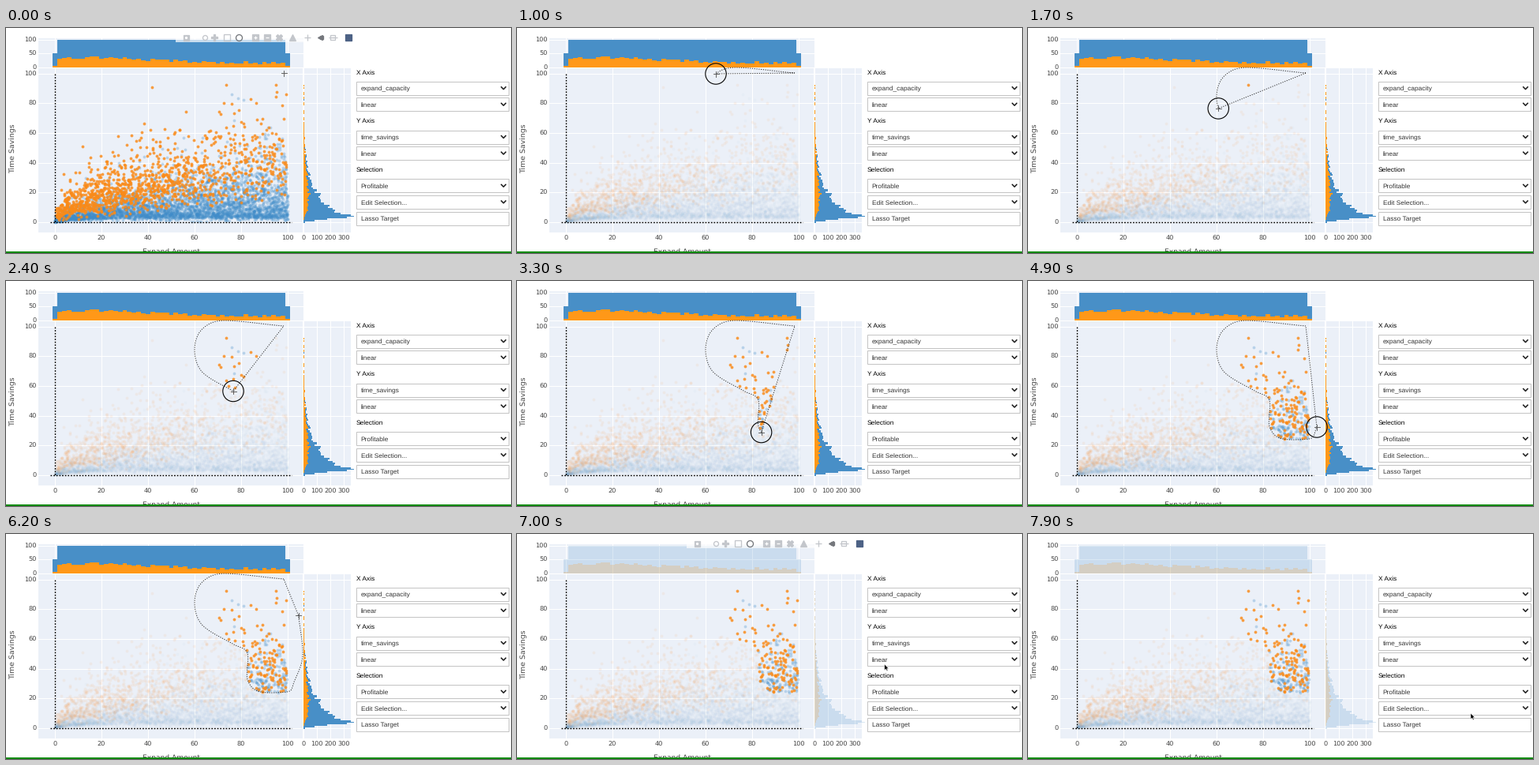
Write a matplotlib script that moves like this. It is 640 px wide and 285 px high and loops after 8 s.

```python
import numpy as np
import matplotlib.pyplot as plt
from matplotlib.animation import FuncAnimation
from matplotlib.patches import Circle, Polygon, Rectangle
from matplotlib.path import Path

W, H, DPI = 640, 285, 100
STEP, FRAMES = 100, 80
PX = 72 / DPI
BLUE, ORANGE, PANEL = "#488fc7", "#ff9818", "#ebf0f8"
PRESS, RELEASE, REFRESH = 300, 6150, 6600
LEAVE, ARRIVE = 6500, 7500

plt.rcParams["text.hinting"] = "none"
fig = plt.figure(figsize=(W / DPI, H / DPI), dpi=DPI, facecolor="white")
ax = fig.add_axes([0, 0, 1, 1])
ax.set_xlim(0, W)
ax.set_ylim(H, 0)
ax.axis("off")


def to_x(v):
    return 62 + 2.95 * np.asarray(v)


def to_y(v):
    return 246 - 1.885 * np.asarray(v)


def box(x0, y0, x1, y1, **kw):
    kw.setdefault("lw", 0)
    return ax.add_patch(Rectangle((x0, y0), x1 - x0, y1 - y0, **kw))


def line(xs, ys, color, width=1, **kw):
    return ax.plot(xs, ys, color=color, lw=width * PX, **kw)[0]


def label(x, y, s, size, font="DejaVu Sans", color="#444444", **kw):
    kw.setdefault("va", "baseline")
    return ax.text(x, y, s, fontsize=size * PX, family=font, color=color, **kw)


# ---- data ----
def make_data(n=5000):
    rng = np.random.default_rng(12)
    x = np.linspace(0, 100, n)
    base = 3 * (1 - np.exp(-x / 12))
    spread = 20 * (x / 100) ** 0.4
    y = base + spread * rng.exponential(size=n) ** 0.85
    band = np.abs(base + 1 + rng.normal(0, 1.5, n) * np.minimum(1, x / 20))
    y = np.where(rng.random(n) < 0.12, band, y)
    y = np.where(y > 95, 0.6 * y, y)
    cost = (5 + 0.4 * x) * np.exp(rng.normal(0, 0.5, n))
    return x, y, y > cost


x, y, good = make_data()
points = np.column_stack([to_x(x), to_y(y)])

# ---- panels and grids ----
TOP, MAIN, SIDE = (41, 13, 376.5, 49.5), (41, 51, 375.5, 259), (377.5, 51, 437, 259)
for area in (TOP, MAIN, SIDE):
    box(*area, fc=PANEL)


def vgrid(gx, area):
    line([gx, gx], area[1::2], "white")


def hgrid(gy, area):
    line(area[::2], [gy, gy], "white")


for v in range(0, 101, 20):
    vgrid(to_x(v), TOP)
    vgrid(to_x(v), MAIN)
    hgrid(to_y(v), MAIN)
    hgrid(to_y(v), SIDE)
    label(to_x(v), 269, v, 8.1, ha="center")
    label(38.5, to_y(v) + 3, v, 8.1, ha="right")
for v in range(0, 101, 50):
    gy = 49.5 - 0.345 * v
    hgrid(gy, TOP)
    label(38.5, gy + 3, v, 8.1, ha="right")
for v in range(0, 301, 100):
    gx = 377.3 + 0.17 * v
    vgrid(gx, SIDE)
    label(gx, 269, v, 8.1, ha="center")
label(8.6, 153, "Time Savings", 9.4, rotation=90, ha="center", va="center")
label(209, 286, "Expand Amount", 9.1, ha="center")

# ---- marginal histograms ----
xbins = np.arange(-1, 102, 2)
ybins = np.arange(-0.5, 101)


def top_bar(values, color):
    count = np.histogram(values, xbins)[0]
    return ax.stairs(49.5 - 0.345 * np.minimum(count, 100), to_x(xbins), baseline=49.5,
                     fill=True, color=color, lw=0, zorder=3)


def side_bar(values, color):
    count = np.histogram(values, ybins)[0]
    length = np.where(count > 0, np.maximum(0.7, 0.17 * count), 0)
    return ax.stairs(377.3 + length, to_y(ybins), baseline=377.3, fill=True,
                     orientation="horizontal", color=color, lw=0, zorder=3)


bars = [top_bar(x, BLUE), top_bar(x[good], ORANGE),
        side_bar(y, BLUE), side_bar(y[good], ORANGE)]


# ---- scatter layers: artist, members, shown when selected ----
def dots(color, alpha):
    return ax.plot([], [], "o", ms=3.8 * PX, mew=0, color=color, alpha=alpha)[0]


layers = [(dots("#3f8cc9", 0.025), ~good, False), (dots("#ff8c2a", 0.08), good, False),
          (dots("#3f8cc9", 0.3), ~good, True), (dots("#fa8a18", 0.82), good, True)]

DOTTED = (0, (1.3, 1.3))
line([62, 62], [58, 246], "black", 1.4, ls=DOTTED)
line([56, 362], [246, 246], "black", 1.4, ls=DOTTED)

# ---- controls ----
SANS = "Liberation Sans"
groups = (("X Axis", "expand_capacity", "linear"), ("Y Axis", "time_savings", "linear"),
          ("Selection", "Profitable", "Edit Selection...", "Lasso Target"))
for g, (title, *fields) in enumerate(groups):
    top = 55.5 + 61.8 * g
    label(444, top + 3, title, 8.4, SANS, "black")
    for k, s in enumerate(fields):
        cy = top + 20.7 + 20.6 * k
        box(444, cy - 8.5, 637, cy + 8.5, fc="white", ec="#c4c4c4", lw=PX)
        label(449.5, cy + 3.1, s, 8.4, SANS, "#333333")
        if s != "Lasso Target":
            line([627.8, 630.5, 633.2], cy + np.array([-1.4, 1.4, -1.4]), "#222222", 1.6)
box(0, 283.3, W, H, fc="#0a8a0a", zorder=8)


# ---- toolbar ----
def make_toolbar():
    grey, dark, logo = "#c3c6cb", "#74777c", "#4d6285"
    out = [(box(215, 6, 441, 18, fc="white", zorder=5), 0.7)]

    def icon(cx, marker, color=grey, size=8, hollow=False):
        art, = ax.plot(cx, 12, marker, ms=size * PX, mec=color, mew=1.3 * PX,
                       mfc="none" if hollow else color, zorder=6)
        out.append((art, 1))

    icon(228, "s", size=7)
    icon(228, "o", "white", 2)
    icon(252, "o", size=6, hollow=True)
    icon(264, "P")
    icon(280, "s", hollow=True)
    icon(295, "o", dark, hollow=True)
    for cx, sign in ((316, "+"), (331, "_")):
        icon(cx, "s")
        icon(cx, sign, "white", 5)
    icon(346, "X")
    icon(363, "^")
    icon(382, "+")
    icon(398, "<", dark, 6)
    icon(400, "s", dark, 5)
    for dx in (-2, 2):
        icon(414 + dx, "_", size=7)
    icon(414, "s", size=6, hollow=True)
    icon(434, "s", logo)
    return out


toolbar = make_toolbar()

# ---- pointer and lasso: ms, x, y ----
keys = np.array([
    (300, 352, 57), (750, 270, 50.5), (1000, 252, 58), (1500, 239, 88),
    (1850, 246, 112), (2400, 288, 139.5), (2720, 305, 149), (3150, 306, 184),
    (3450, 315, 197), (4000, 351, 200.5), (4900, 366, 185), (5500, 376, 154),
    (6150, 370.5, 103)], float)
KT, KP = keys[:, 0], keys[:, 1:]
SLOPE = np.gradient(KP, KT, axis=0)
HOME = np.array([561, 227])


def pointer(t):
    """Cubic Hermite path through the keys, then an eased move to the controls."""
    t = np.atleast_1d(t).astype(float)
    s = np.clip(t, KT[0], KT[-1])
    i = np.clip(np.searchsorted(KT, s, side="right") - 1, 0, len(KT) - 2)
    span = (KT[i + 1] - KT[i])[:, None]
    u = (s - KT[i])[:, None] / span
    p = ((1 + 2 * u) * (1 - u) ** 2 * KP[i] + u * (1 - u) ** 2 * span * SLOPE[i]
         + u ** 2 * (3 - 2 * u) * KP[i + 1] + u ** 2 * (u - 1) * span * SLOPE[i + 1])
    e = np.clip((t - LEAVE) / (ARRIVE - LEAVE), 0, 1)[:, None]
    return p + (HOME - p) * e * e * (3 - 2 * e)


lasso = line([], [], "#333333", 1, ls=(0, (1.2, 1.6)), zorder=4)
cross = [line([], [], "#555555", 0.9, zorder=9) for _ in range(2)]
ring = ax.add_patch(Circle((0, 0), 13.2, fc="none", ec="black", lw=1.1 * PX, zorder=9))
ARROW = np.array([(0, 0), (0, 7.5), (1.8, 6), (3, 8.6), (4.2, 8), (3, 5.5), (5.3, 5.5)])
arrow = ax.add_patch(Polygon(ARROW, fc="black", ec="white", lw=0.5 * PX, zorder=9))


def toolbar_opacity(t):
    return float(np.interp(t, [300, 600, 6200, 6400, 7000, 7300], [1, 0, 0, 1, 1, 0]))


def update(i):
    t = i * STEP
    px, py = pointer(t)[0]

    chosen = np.ones(len(x), bool)
    drawing = t > PRESS
    if drawing:
        loop = pointer(np.arange(PRESS, min(t, RELEASE) + 1, 25))
        loop = np.vstack([loop, loop[:1]])
        chosen = Path(loop).contains_points(points)
        lasso.set_data(*loop.T)
    lasso.set_visible(drawing and t < REFRESH)
    for art, members, picked in layers:
        art.set_data(*points[members & (chosen == picked)].T)

    for b in bars:
        b.set_alpha(0.2 if t >= REFRESH else 1)
    for art, alpha in toolbar:
        art.set_alpha(alpha * toolbar_opacity(t))

    on_plot = px < SIDE[2]
    cross[0].set_data([px - 3.5, px + 3.5], [py, py])
    cross[1].set_data([px, px], [py - 3.5, py + 3.5])
    for c in cross:
        c.set_visible(on_plot)
    ring.center = px, py
    ring.set_visible(PRESS <= t < RELEASE)
    arrow.set_xy(ARROW + (px, py))
    arrow.set_visible(not on_plot)
    return []


anim = FuncAnimation(fig, update, frames=FRAMES, interval=STEP, repeat=True,
                     repeat_delay=0, blit=False)
plt.show()
```
